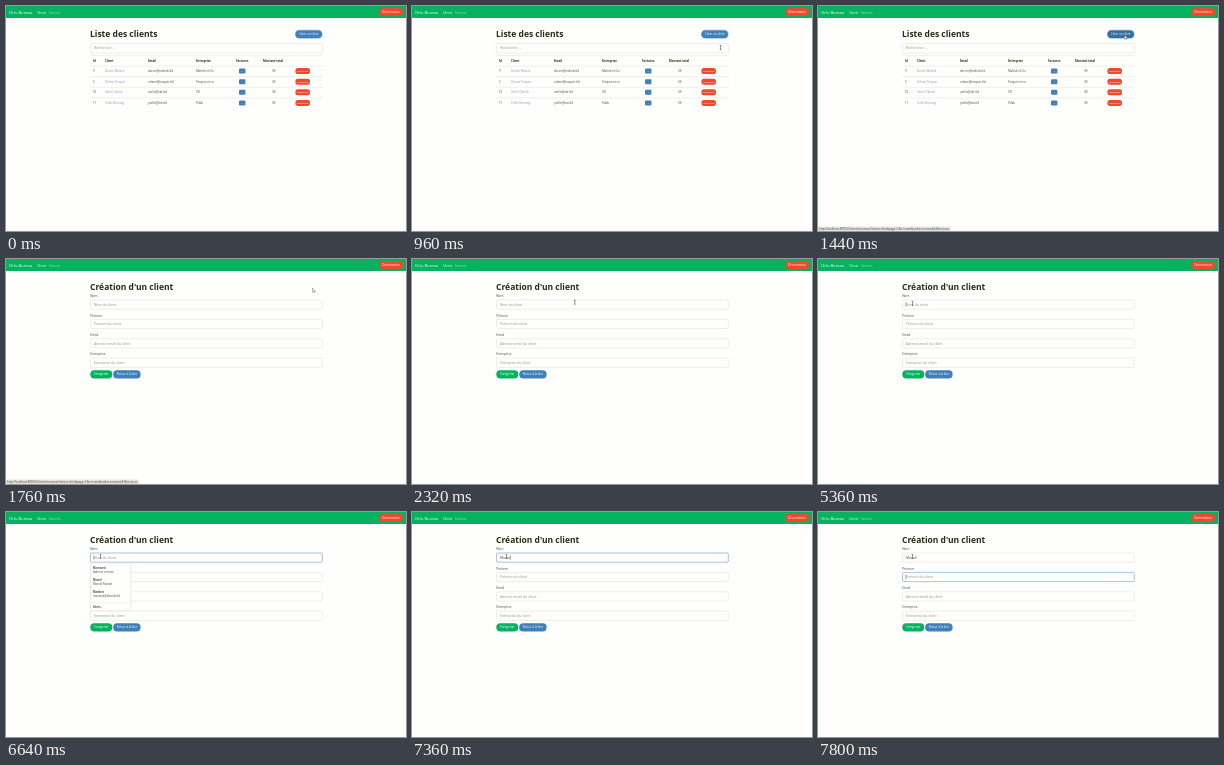
Recreate the animation shown at these times as an HTML page. Size 400 px wide and 225 px high, loop 8 s.

```html
<!DOCTYPE html>
<html lang="fr">
<head>
<meta charset="utf-8">
<title>Gestion des clients</title>
<style>
  html, body { margin: 0; width: 100%; height: 100%; overflow: hidden; background: #fefefc; }
  svg { display: block; width: 100%; height: 100%; font-family: "Open Sans", "Noto Sans", sans-serif; }
</style>
</head>
<body>
<svg id="stage" viewBox="0 0 400 225"></svg>
<script>
const LOOP = 8000, STEP = 40;
const PAPER = '#fefefc', GREEN = '#04b25f', BLUE = '#3f80ba', RED = '#ee4a30';
const DARK = '#2c2a18', BODY = '#4b4a3a', GRAY = '#94947a', LINE = '#dedfd6', FOCUS = '#9dbfe6';

const text = (x, y, size, fill, content, extra = '') =>
  `<text x="${x}" y="${y}" font-size="${size}" fill="${fill}" ${extra}>${content}</text>`;
const box = (x, y, w, h, r, fill, extra = '') =>
  `<rect x="${x}" y="${y}" width="${w}" height="${h}" rx="${r}" fill="${fill}" ${extra}/>`;
const rule = y => `<path d="M84 ${y}H317" stroke="${LINE}" stroke-width=".5"/>`;
const group = (id, content) => `<g id="${id}">${content}</g>`;
const BOLD = 'font-weight="700"', SEMI = 'font-weight="600"', MIDDLE = 'text-anchor="middle"';

const button = (x, y, w, h, r, fill, label, size, id = '') =>
  box(x, y, w, h, r, fill, id && `id="${id}"`) +
  text(x + w / 2, y + h / 2 + size * .36, size, '#fff', label, MIDDLE);

const nav = box(0, 0, 400, 12, 0, GREEN) +
  text(3, 7.7, 4.1, '#fff', 'Orlu Bureau') +
  text(31, 7.5, 2.9, '#fff', 'Clients') +
  text(43, 7.5, 2.9, '#a5e39c', 'Factures') +
  button(373, 2, 24, 8, 4, RED, 'Déconnexion', 2.9);

const title = content => text(84, 30.8, 8.5, DARK, content, BOLD);

const rows = [
  [9, 'Dorvin Malesk', 'dorvin@malesk.tld', 'Malesk et Cie'],
  [5, 'Orlane Tesquin', 'orlane@tesquin.tld', 'Tesquin et co'],
  [10, 'Varlin Obresk', 'varlin@obr.tld', 'VO'],
  [11, 'Yselle Brantog', 'yselle@bra.tld', 'Yslab']
];
const headers = [[87, 'Id'], [99, 'Client'], [142, 'Email'], [190, 'Entreprise'],
  [230, 'Factures'], [257, 'Montant total']];

const listPage = title('Liste des clients') +
  box(288.9, 23.7, 27.7, 9, 4.5, '#9dc0da') +
  button(289.6, 24.4, 26.3, 7.6, 3.8, BLUE, 'Créer un client', 2.9, 'create') +
  box(84.3, 37.4, 232.2, 9.6, 1, PAPER, `stroke="${LINE}" stroke-width=".5"`) +
  text(88, 43.2, 3.4, GRAY, 'Rechercher ...') +
  rule(49.7) +
  headers.map(([x, label]) => text(x, 56.3, 2.9, DARK, label, BOLD)).join('') +
  rows.map(([id, name, mail, company], i) => {
    const y = 65.1 + i * 10.6;
    return rule(y - 5) +
      text(87, y + 1, 2.8, BODY, id) +
      text(99, y + 1, 2.9, '#8b99bd', name) +
      text(142, y + 1, 2.9, BODY, mail) +
      text(190, y + 1, 2.9, BODY, company) +
      button(233, y - 2.5, 6.4, 5, 1.2, BLUE, i ? 1 : 2, 2.5) +
      text(268, y + 1, 2.9, BODY, '0€', MIDDLE) +
      button(289.4, y - 3, 14.6, 6, 2.6, RED, 'Supprimer', 2.5);
  }).join('');

const fields = [['Nom', 'Nom du client'], ['Prénom', 'Prénom du client'],
  ['Email', 'Adresse email du client'], ['Entreprise', 'Entreprise du client']];

const formPage = title("Création d'un client") +
  fields.map(([label, hint], i) => {
    const y = 41 + i * 19.4;
    return text(84.2, y - 2.9, 3.2, BODY, label) +
      box(84.5, y, 231.8, 9.2, 1, PAPER, `stroke="${LINE}" stroke-width=".5"`) +
      box(84.5, y, 231.8, 9.2, 1, 'none', `id="ring${i}" stroke="${FOCUS}" stroke-width=".8"`) +
      text(88, y + 5.9, 3.4, GRAY, hint, `id="hint${i}"`);
  }).join('') +
  text(88, 46.9, 3.4, BODY, '', 'id="typed"') +
  '<path id="caret" stroke="#222" stroke-width=".4"/>' +
  button(84.3, 111.2, 22, 8.2, 4, GREEN, 'Enregistrer', 2.8) +
  button(107.2, 111.2, 27.4, 8.2, 4, BLUE, 'Retour à la liste', 2.8);

const entries = [['Montevrol', 'Adresse et nom'], ['Morvel', 'Morvel Ysande'], ['Mandrot', 'mandrot@obresk.tld']];
const suggestions =
  box(84.6, 50.9, 40.2, 47.8, .8, PAPER, 'stroke="#d9d9dc" stroke-width=".5"') +
  entries.map(([name, detail], i) =>
    text(87, 57.3 + i * 12, 2.6, DARK, name, SEMI) +
    text(87, 61.3 + i * 12, 2.8, BODY, detail)).join('') +
  `<path d="M84.8 91H124.6" stroke="${LINE}" stroke-width=".4"/>` +
  text(87, 95.6, 2.6, DARK, 'Gérer…', SEMI);

const status = box(0, 220.6, 133, 4.4, 0, '#e4e4da') +
  text(1, 223.9, 2.8, BODY,
    'http://localhost:8000/#/clients/nouveau?retour=liste&amp;page=1&amp;tri=nom&amp;ordre=croissant&amp;filtre=tous');

const pointer = group('arrow',
    '<path d="M0 0V4.2L1 3.3L1.7 4.7L2.3 4.4L1.7 3.1H3Z" fill="#fff" stroke="#333" stroke-width=".35"/>') +
  group('beam', '<path d="M-.8-2H.8M0-2V2M-.8 2H.8" fill="none" stroke="#333" stroke-width=".5"/>');

document.getElementById('stage').innerHTML = box(0, 0, 400, 225, 0, PAPER) + nav +
  group('list', listPage) + group('form', formPage) +
  group('suggestions', suggestions) + group('status', status) + group('pointer', pointer);

const el = id => document.getElementById(id);
const show = (id, visible) => el(id).setAttribute('display', visible ? 'inline' : 'none');
const clamp = v => Math.max(0, Math.min(1, v));
const ramp = (t, start, length) => clamp((t - start) / length);
const ease = v => v * v * (3 - 2 * v);

// Pointer stops: time, x, y
const route = [[240, 404, 150], [840, 325, 58], [960, 308.5, 41.5], [1200, 306.5, 29],
  [1800, 306.5, 29], [2540, 124, 47], [3240, 94.5, 44.5]];

function pointerAt(t) {
  const next = route.findIndex(stop => stop[0] > t);
  if (next === 0) return route[0].slice(1);
  if (next < 0) return route[route.length - 1].slice(1);
  const [t0, x0, y0] = route[next - 1], [t1, x1, y1] = route[next];
  const k = ease((t - t0) / (t1 - t0));
  return [x0 + (x1 - x0) * k, y0 + (y1 - y0) * k];
}

const NAME = 'Morvel', keys = [6680, 6800, 6960, 7080, 7240, 7400];
const CLICK = 5360, TAB = 7600, PAGE = 1520;

function draw(t) {
  const onForm = t >= PAGE;
  show('list', !onForm);
  show('form', onForm);

  const [x, y] = pointerAt(t);
  const inField = x > 84 && x < 317 && (onForm ? y > 41 && y < 50.5 : y > 37 && y < 47);
  el('pointer').setAttribute('transform', `translate(${x} ${y})`);
  show('beam', inField);
  show('arrow', !inField);

  el('create').setAttribute('fill', t >= 1120 ? '#346f9f' : BLUE);
  show('status', t >= 1160 && t < 2200);

  const firstFocus = ramp(t, CLICK, 160) - ramp(t, TAB, 160);
  const focus = [firstFocus, ramp(t, TAB, 160), 0, 0];
  focus.forEach((amount, i) => el('ring' + i).setAttribute('opacity', amount));

  const count = keys.filter(k => t >= k).length;
  el('typed').textContent = NAME.slice(0, count);
  show('hint0', !count);
  show('suggestions', t >= 5480 && t < 7000);

  const second = t >= TAB;
  const since = t - (second ? TAB : count ? keys[count - 1] : CLICK);
  show('caret', t >= CLICK && since % 1000 < 500);
  const caretX = 88 + (second || !count ? -.1 : el('typed').getComputedTextLength() + .2);
  el('caret').setAttribute('d', `M${caretX} ${second ? 62.8 : 43.4}v4.4`);
}

function tick() {
  draw(Math.floor(performance.now() % LOOP / STEP) * STEP);
  requestAnimationFrame(tick);
}
tick();
</script>
</body>
</html>
```
